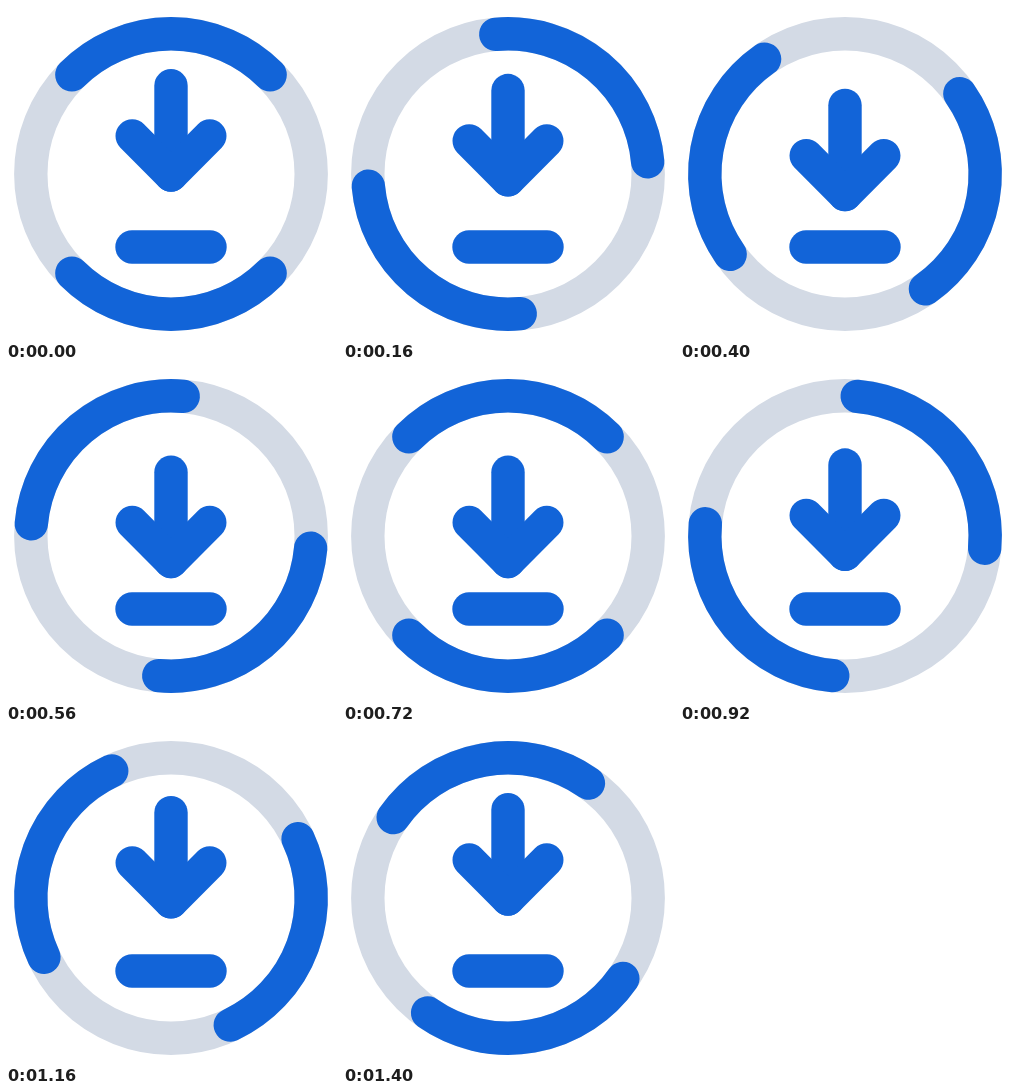
These frames come from a looping animation (331 by 334 pixels, 1440 ms). An HTML page with a canvas:

```html
<!DOCTYPE html>
<html lang="en">
<head>
<meta charset="utf-8">
<title>Download</title>
<style>
  html, body { margin: 0; width: 100%; height: 100%; overflow: hidden; background: #fff; }
  canvas { display: block; }
</style>
</head>
<body>
<canvas id="stage" width="331" height="334"></canvas>
<script>
const ctx = document.getElementById("stage").getContext("2d");
const LOOP = 1440, STEP = 40, HALF = LOOP / 2, MOVE = 560;
const CX = 165, CY = 168, RADIUS = 140.2, DROP = 24.5;
const BLUE = "#1264d8", TRACK = "#d3dae5";

const smooth = p => p * p * (3 - 2 * p);

function arc(from, sweep, color) {
  ctx.strokeStyle = color;
  ctx.beginPath();
  ctx.arc(CX, CY, RADIUS, from, from + sweep);
  ctx.stroke();
}

function line(...points) {
  ctx.beginPath();
  points.forEach(([x, y]) => ctx.lineTo(x, y));
  ctx.stroke();
}

// The arrow eases down, rests, eases back up and rests again.
function arrowOffset(time) {
  const eased = smooth(Math.min(1, (time % HALF) / MOVE));
  return DROP * (time < HALF ? eased : 1 - eased);
}

function draw(time) {
  ctx.fillStyle = "#fff";
  ctx.fillRect(0, 0, 331, 334);
  ctx.lineWidth = 33.4;
  ctx.lineCap = ctx.lineJoin = "round";

  arc(0, Math.PI * 2, TRACK);
  const start = -Math.PI * 0.75 + Math.PI * 2 * time / LOOP;
  arc(start, Math.PI / 2, BLUE);
  arc(start + Math.PI, Math.PI / 2, BLUE);

  line([126, 241], [204, 241]);

  const y = arrowOffset(time);
  line([CX, 79.7 + y], [CX, 169 + y]);
  line([126.2, 130 + y], [CX, 169 + y], [203.8, 130 + y]);
}

const origin = performance.now();

function tick() {
  const elapsed = (performance.now() - origin) % LOOP;
  draw(Math.floor(elapsed / STEP) * STEP);
  requestAnimationFrame(tick);
}

tick();
</script>
</body>
</html>
```
